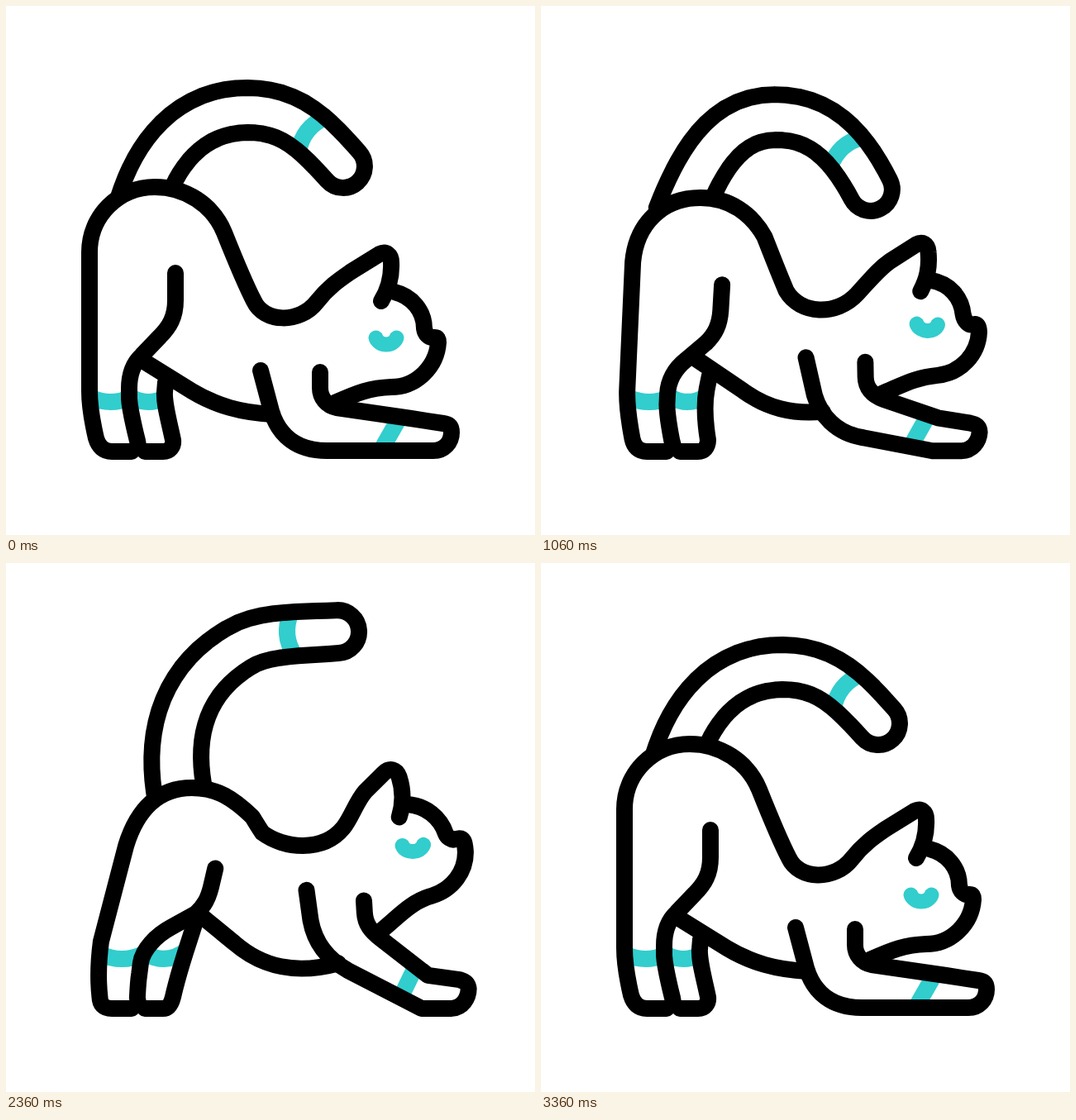
Animation, 640 px wide and 640 px high, one loop 3580 ms. Source, as an HTML page:

```html
<!DOCTYPE html>
<html lang="en">
<head>
<meta charset="utf-8">
<title>Stretching cat</title>
<style>
  html, body { margin: 0; width: 100%; height: 100%; overflow: hidden; background: #fff; }
  svg { display: block; width: 100vw; height: 100vh; }
  path { fill: none; stroke: #000; stroke-width: 20; stroke-linecap: round; stroke-linejoin: round; }
  .band { stroke: #32cdcd; stroke-linecap: butt; }
  .eye { stroke: #32cdcd; stroke-width: 18; }
  .fur { fill: #fff; stroke: none; }
</style>
</head>
<body>
<svg id="stage" viewBox="0 0 640 640"></svg>
<script>
const LOOP = 3580;
const stage = document.getElementById('stage');

const torso = [
  'M152 539L128 539C118 539 112 533 109 523C106 510 101 488 101 466L101 298C101 254 136 219 180 219C217 219 250 240 264 274C276 304 288 334 300 357C312 383 355 385 376 358C391 339 405 330 418 321L452 300C460 296 466 301 466 310C467 330 462 344 454 357',
  'M152 539L128 539C118 539 112 533 109 523C106 510 99 486 99 465L94 294C93 248 127 212 177 212C214 212 245 234 257 266C268 296 279 326 290 354C302 387 345 388 370 362C390 341 402 332 416 325L452 306C460 303 466 307 465 317C465 338 460 350 451 364',
  'M152 539L128 539C118 539 114 534 114 525C112 505 113 485 117 457L152 348C168 303 193 280 231 280C262 280 279 292 303 312C306 315 309 319 313 323C340 340 388 346 413 315C422 303 426 284 437 270L458 247C465 240 473 242 477 251C483 267 484 282 479 300'
];

// Each shape: class and its path at rest, leaning back and stretched forward.
// "slide" gives the range of numbers that follow the front paw.
const shapes = [
  { cls: 'fur', poses: torso },
  { cls: 'band', poses: [
    'M104 474Q126 484 150 474', 'M102 474Q126 484 150 474', 'M116 473Q142 485 168 473'] },
  { cls: 'band', poses: [
    'M153 474Q172 484 192 474', 'M152 474Q170 484 190 474', 'M172 473Q198 487 222 468'] },
  { cls: 'band', slide: [0, 4], poses: [
    'M475 500L455 535', 'M455 500L434 535', 'M500 484L482 522'] },
  { cls: 'torso', poses: torso },
  { cls: 'far-leg', poses: [
    'M193 455L192 467C191 480 196 497 202 525C203 533 198 539 190 539L168 539',
    'M191 455L190 467C189 480 193 497 202 525C203 533 198 539 190 539L168 539',
    'M235 428L226 455C218 478 209 503 202 525C199 535 196 539 190 539L168 539'] },
  { cls: 'belly', poses: [
    'M167 430L225 466C255 484 285 492 322 494',
    'M167 430L228 468C255 485 280 492 310 494',
    'M240 422L283 459C318 490 360 499 414 483'] },
  { cls: 'haunch', poses: [
    'M205 323L205 356C205 376 198 388 186 400L164 423C152 434 149 448 149 463L149 475C150 490 155 510 159 526L160 532',
    'M202 321L202 356C202 376 196 388 184 400L163 422C151 434 148 448 148 463L148 475C149 490 154 510 158 526L160 532',
    'M260 376L254 397C250 410 246 418 236 427L205 443C185 453 168 470 165 486L163 500C161 510 160 520 159 526L160 532'] },
  { cls: 'head', poses: [
    'M470 346C491 351 506 369 506 390C507 397 512 402 517 401L519 401C522 401 523 403 523 407C521 436 497 461 466 461C440 462 425 468 398 480',
    'M465 352C487 357 500 374 500 396C501 405 506 412 512 411L514 411C516 412 517 413 517 417C515 446 491 469 462 469C434 469 418 474 391 481',
    'M488 284C511 285 529 300 536 318C538 322 543 326 548 324L553 323C558 323 560 326 561 340C562 362 548 385 522 394C497 402 482 422 461 441'] },
  { cls: 'front-leg', slide: [10, 28], poses: [
    'M308 441L321 490C330 520 352 538 388 538L482 538L517 538C530 538 539 528 539 516C539 508 536 506 529 505L490 499L400 486C388 484 380 474 380 462L380 443',
    'M299 440L312 490C321 515 343 537 378 537L460 538L494 538C507 538 516 528 517 516C517 508 513 506 506 505L466 498L394 486C380 484 372 474 372 462L372 442',
    'M372 390L376 425C380 450 392 470 418 487L506 539L543 539C556 538 563 526 563 515C562 508 558 506 552 504L514 499L462 451C449 440 443 432 442 418L441 404'] },
  { cls: 'eye', poses: [
    'M447.5 401.5C451 412 469 412 472.5 401.5',
    'M442 406C446 417 464 418 467.5 408',
    'M484.5 333.5C488 343 506 343 510 332'] }
];

const numbers = text => text.match(/-?[\d.]+/g).map(Number);

// Centre line of the tail over time.
const tailRest = 'M163 240C185 168 230 126 292 126C345 126 372 154 408 194';
const tailLow = 'M150 242C190 172 220 146 268 146C330 146 362 185 384 263';
const tailKeys = [
  [210, tailRest],
  [760, tailLow],
  [1340, 'M192 272C204 170 245 120 307 120C348 120 380 143 412 163'],
  [1880, 'M225 302C190 215 214 145 284 106C313 90 350 89 394 86'],
  [2150, 'M224 305C196 225 200 145 270 98C300 78 338 73 384 67'],
  [2360, 'M214 296C195 220 208 145 284 101C312 85 350 86 401 83'],
  [2620, 'M172 255C190 180 240 128 303 128C350 128 372 152 414 183'],
  [2940, tailLow],
  [3370, tailRest]
].map(([time, path]) => [time, numbers(path)]);

const restKeys = [[210, 1], [680, 0], [2900, 0], [3370, 1]];
const stretchKeys = [[640, -.03], [760, 0], [1340, .625], [1880, 1], [2150, 1.08], [2360, .885], [2620, .31], [2900, -.03]];
const pawKeys = [[2150, 0], [2360, 2], [2620, 8], [2900, 23]];

// Monotone cubic interpolation, flat at both ends and at turning points.
function curve(keys, t, value = v => v) {
  const last = keys.length - 1;
  if (t <= keys[0][0]) return value(keys[0][1]);
  if (t >= keys[last][0]) return value(keys[last][1]);
  const i = keys.findIndex(key => key[0] > t) - 1;
  const slope = k => (value(keys[k + 1][1]) - value(keys[k][1])) / (keys[k + 1][0] - keys[k][0]);
  const tangent = k => {
    if (k === 0 || k === last) return 0;
    const a = slope(k - 1), b = slope(k);
    return a * b <= 0 ? 0 : 2 * a * b / (a + b);
  };
  const span = keys[i + 1][0] - keys[i][0], p = (t - keys[i][0]) / span, q = 1 - p;
  return value(keys[i][1]) * q * q * (1 + 2 * p) + value(keys[i + 1][1]) * p * p * (3 - 2 * p)
    + span * p * q * (q * tangent(i) - p * tangent(i + 1));
}

function fill(template, values) {
  let i = 0;
  return template.replace(/-?[\d.]+/g, () => values[i++].toFixed(2));
}

function makePath(cls) {
  const path = document.createElementNS('http://www.w3.org/2000/svg', 'path');
  path.setAttribute('class', cls);
  return path;
}

const spine = makePath('spine');
const [tailFur, tailBand, tailEdge] = ['fur', 'band', 'edge'].map(cls => stage.appendChild(makePath(cls)));
for (const shape of shapes) {
  shape.path = stage.appendChild(makePath(shape.cls));
  shape.values = shape.poses.map(numbers);
}

// Point beside the spine: "along" and "across" are measured in its local frame.
function beside(at, along, across) {
  const p = spine.getPointAtLength(at), a = spine.getPointAtLength(at - 3), b = spine.getPointAtLength(at + 3);
  const size = Math.hypot(b.x - a.x, b.y - a.y), ux = (b.x - a.x) / size, uy = (b.y - a.y) / size;
  return `${(p.x + ux * along - uy * across).toFixed(2)} ${(p.y + uy * along + ux * across).toFixed(2)}`;
}

function drawTail(t, stretch) {
  spine.setAttribute('d', fill(tailRest, tailKeys[0][1].map((_, i) => curve(tailKeys, t, v => v[i]))));
  const length = spine.getTotalLength(), steps = 28;
  const outer = [], inner = [];
  for (let i = 0; i <= steps; i++) {
    const s = i / steps, half = 26 + 2.5 * (1 + stretch) * (1 - s);
    outer.push(beside(s * length, 0, -half));
    inner.unshift(beside(s * length, 0, half));
  }
  const d = `M${outer.join('L')}A26 26 0 0 1 ${inner.join('L')}`;
  tailFur.setAttribute('d', d);
  tailEdge.setAttribute('d', d);
  const at = length - 60;
  tailBand.setAttribute('d', `M${beside(at, 6, -26)}Q${beside(at, -8, 0)} ${beside(at, 6, 26)}`);
}

function drawCat(t, stretch) {
  const rest = curve(restKeys, t), paw = curve(pawKeys, t);
  for (const { path, poses, values: [still, back, forward], slide: [from, to] = [0, 0] } of shapes) {
    const mixed = still.map((v, i) => {
      const shift = i >= from && i < to && i % 2 === 0 ? paw : 0;
      const moving = back[i] + (forward[i] - back[i]) * stretch + shift;
      return moving + (v - moving) * rest;
    });
    path.setAttribute('d', fill(poses[0], mixed));
  }
}

function render(t) {
  const stretch = curve(stretchKeys, t);
  drawTail(t, stretch);
  drawCat(t, stretch);
}

const start = performance.now();
function tick() {
  render((performance.now() - start) % LOOP);
  requestAnimationFrame(tick);
}
render(0);
requestAnimationFrame(tick);
</script>
</body>
</html>
```
